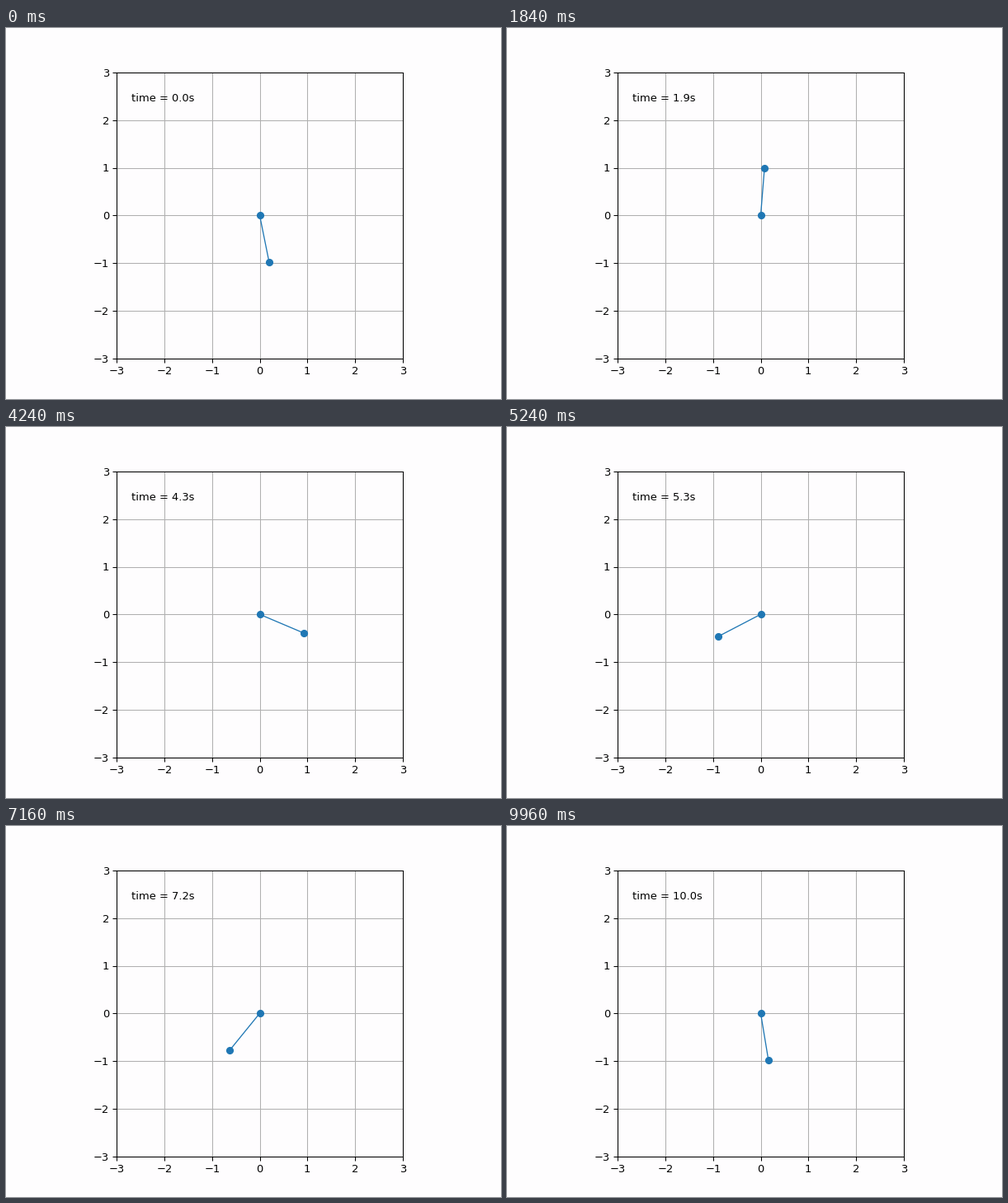
A matplotlib script for the animation above (10000 ms loop, 600 px wide and 450 px high).

```python
import numpy as np
import matplotlib.pyplot as plt
from matplotlib.animation import FuncAnimation

G = 9.8          # gravity
LENGTH = 1.0     # rod length
DAMPING = 0.5    # linear friction
START = (0.0, 10.0)  # angle from straight down, angular speed

DT = 0.02
STRIDE = 2       # simulation samples per drawn frame
FRAMES = 250
INTERVAL = 40
PAPER = "#fefdfe"


def slope(state):
    angle, speed = state
    return np.array([speed, -DAMPING * speed - G / LENGTH * np.sin(angle)])


def rk4(state, h):
    k1 = slope(state)
    k2 = slope(state + h / 2 * k1)
    k3 = slope(state + h / 2 * k2)
    k4 = slope(state + h * k3)
    return state + h / 6 * (k1 + 2 * k2 + 2 * k3 + k4)


def simulate(samples, substeps=8):
    state = np.array(START)
    angles = [state[0]]
    for _ in range(samples):
        for _ in range(substeps):
            state = rk4(state, DT / substeps)
        angles.append(state[0])
    return np.array(angles)


angles = simulate(FRAMES * STRIDE)
xs = LENGTH * np.sin(angles)
ys = -LENGTH * np.cos(angles)

# 6.4 x 4.8 inches at this density is exactly 600 x 450 pixels
fig = plt.figure(figsize=(6.4, 4.8), dpi=93.75, facecolor=PAPER)
ax = fig.add_subplot(xlim=(-3, 3), ylim=(-3, 3), facecolor=PAPER)
ax.set_aspect("equal")
ax.set_xticks(range(-3, 4))
ax.set_yticks(range(-3, 4))
ax.grid()

rod, = ax.plot([], [], "o-", lw=1, color="#1f77b4")
clock = ax.text(0.05, 0.9, "", transform=ax.transAxes)


def update(frame):
    i = STRIDE * frame + 1
    rod.set_data([0, xs[i]], [0, ys[i]])
    clock.set_text(f"time = {i * DT:.1f}s")
    return rod, clock


anim = FuncAnimation(fig, update, frames=FRAMES, interval=INTERVAL,
                     repeat=True, repeat_delay=0)

plt.show()
```
